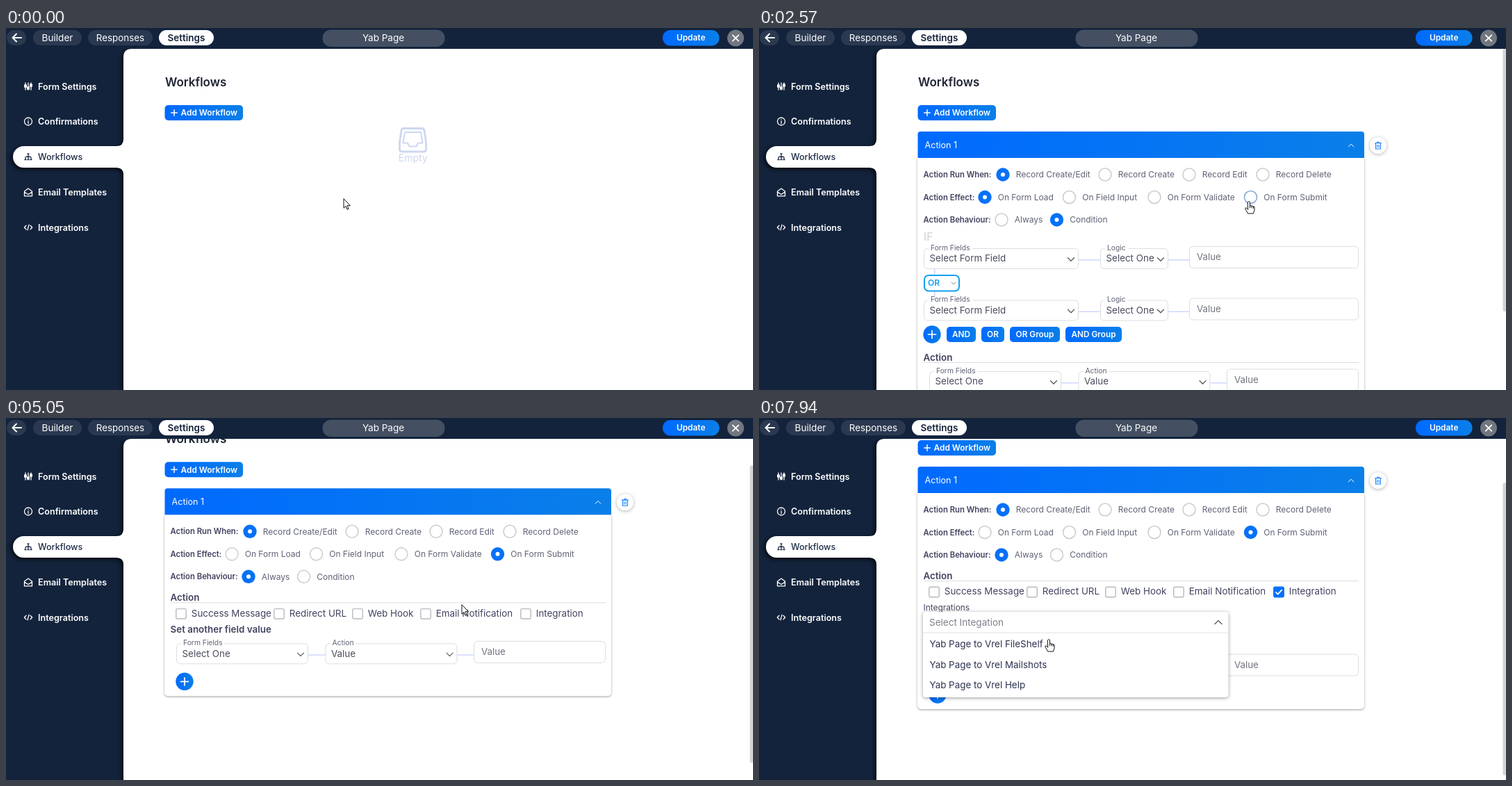
An HTML page with a canvas that plays this animation: 1075 px wide and 521 px high, repeating every 8 s.

```html
<!DOCTYPE html>
<html lang="en">
<head>
<meta charset="utf-8">
<title>Workflow settings</title>
<style>
html, body { margin: 0; width: 100%; height: 100%; overflow: hidden; background: #13233c; }
canvas { display: block; width: 100vw; height: 100vh; }
</style>
</head>
<body>
<canvas id="stage"></canvas>
<script>
const W = 1075, H = 521, LOOP = 8000;
const canvas = document.getElementById('stage');
const ratio = window.devicePixelRatio || 1;
canvas.width = W * ratio;
canvas.height = H * ratio;
const c = canvas.getContext('2d');

const NAVY = '#13233c', BLUE = '#0671f8', INK = '#41435f', GREY = '#5f6275', EDGE = '#dcdde2';
const LINK = '#cfd8fb', PALE = '#cdd7ef';
const APP = 'Yab Page';

// Moments of the user's clicks, in ms
const ADD = 520, OPEN = 1800, SUBMIT = 3130, ALWAYS = 4330, SCROLL = 4920, CHECK = 6070, DROP = 6840;

// Pointer path: time, x, y
const PATH = [
  [30, 486, 246], [380, 300, 122], [930, 300, 122], [1320, 446, 163], [1710, 560, 178],
  [2050, 560, 178], [2560, 705, 249], [2640, 705, 249], [2960, 712, 247], [3200, 712, 247],
  [3650, 397, 243], [3880, 352, 248], [3960, 352, 248], [4180, 349, 275], [4430, 349, 275],
  [4930, 656, 269], [5250, 656, 269], [5950, 748, 251], [6270, 748, 251], [6690, 432, 286],
  [7570, 432, 286], [7630, 427, 285], [7840, 427, 285], [7940, 417, 318]
];
const ARROW_TIMES = [[0, 330], [1000, 1180], [2200, 2420], [4520, 5420], [6360, 6600]];

const clamp = v => Math.max(0, Math.min(1, v));
const ease = v => { v = clamp(v); return v * v * (3 - 2 * v); };
const span = (t, from, to) => ease((t - from) / (to - from));
const mix = (a, b, p) => `rgb(${a.map((v, i) => Math.round(v + (b[i] - v) * p)).join()})`;

function pointer(t) {
  if (t <= PATH[0][0]) return PATH[0].slice(1);
  for (let i = 1; i < PATH.length; i++) {
    const [t0, x0, y0] = PATH[i - 1], [t1, x1, y1] = PATH[i];
    if (t <= t1) {
      const p = span(t, t0, t1);
      return [x0 + (x1 - x0) * p, y0 + (y1 - y0) * p];
    }
  }
  return PATH[PATH.length - 1].slice(1);
}

// Share of the recent past the pointer spent in a box, as a soft hover fade
function hover(t, x, y, w, h) {
  let n = 0;
  for (let k = 0; k < 9; k++) {
    const [px, py] = pointer(t - k * 40);
    if (px >= x && px <= x + w && py >= y && py <= y + h) n++;
  }
  return Math.min(1, n / 4);
}

function text(s, x, cy, size, color, weight = 400, align = 'left') {
  c.font = `${weight} ${size}px Inter, "Open Sans", sans-serif`;
  c.textAlign = align;
  c.fillStyle = color;
  c.fillText(s, x, cy + size * 0.36);
}

function box(x, y, w, h, r, fill, stroke, lw = 1) {
  c.beginPath();
  c.roundRect(x, y, w, h, r);
  if (fill) { c.fillStyle = fill; c.fill(); }
  if (stroke) { c.strokeStyle = stroke; c.lineWidth = lw; c.stroke(); }
}

function disc(x, y, r, fill, stroke, lw = 1) {
  c.beginPath();
  c.arc(x, y, r, 0, 7);
  if (fill) { c.fillStyle = fill; c.fill(); }
  if (stroke) { c.strokeStyle = stroke; c.lineWidth = lw; c.stroke(); }
}

function line(d, x, y, color, lw = 1, fill) {
  const path = new Path2D(d);
  c.save();
  c.translate(x, y);
  c.lineCap = c.lineJoin = 'round';
  if (fill) { c.fillStyle = fill; c.fill(path); }
  c.strokeStyle = color;
  c.lineWidth = lw;
  c.stroke(path);
  c.restore();
}

function shadowed(color, blur, dx, dy, draw) {
  c.save();
  c.shadowColor = color;
  c.shadowBlur = blur * ratio;
  c.shadowOffsetX = dx * ratio;
  c.shadowOffsetY = dy * ratio;
  draw();
  c.restore();
}

function blueFade(x, w) {
  const g = c.createLinearGradient(x, 0, x + w, 0);
  g.addColorStop(0, '#006aff');
  g.addColorStop(1, '#0a7fe8');
  return g;
}

const chevron = (x, y, color, s = 4.5, up) =>
  line(up ? `M${-s} ${s / 2}L0 ${-s / 2}L${s} ${s / 2}` : `M${-s} ${-s / 2}L0 ${s / 2}L${s} ${-s / 2}`, x, y, color, s > 4 ? 1.2 : 1);

const plus = (x, y, s, lw) => line(`M${-s} 0H${s}M0 ${-s}V${s}`, x, y, '#fff', lw);

function button(s, x, y, w) {
  box(x, y, w, 22, 5, blueFade(x, w));
  text(s, x + w / 2, y + 11, 11.8, '#fff', 600, 'center');
}

function roundPlus(x, y) {
  disc(x, y, 12.7, blueFade(x - 13, 26));
  plus(x, y, 5.5, 1.7);
}

function select(label, value, x, y, w) {
  box(x + .5, y + .5, w - 1, 29, 5, '#fff', EDGE);
  c.font = '400 10.3px Inter, "Open Sans", sans-serif';
  c.fillStyle = '#fff';
  c.fillRect(x + 7, y - 2, c.measureText(label).width + 6, 5);
  text(label, x + 10, y - 1, 10.3, GREY);
  text(value, x + 8.5, y + 14.5, 13.4, '#4a4d5e');
  chevron(x + w - 11, y + 16, '#555', 4.5);
}

function valueBox(x, y, w) {
  box(x + .5, y + .5, w - 1, 31, 5, '#fff', EDGE);
  text('Value', x + 11, y + 15.5, 13.3, '#72757f');
}

function link(x0, x1, y) {
  c.fillStyle = LINK;
  c.fillRect(x0, y, x1 - x0, 1.5);
}

function radios(title, cy, items, chosen, t) {
  text(title, 236.5, cy, 11.3, INK, 600);
  items.forEach(([s, x], i) => {
    if (i === chosen) {
      disc(x, cy, 9.7, BLUE);
      disc(x, cy, 3, '#fff');
    } else {
      const live = t > 2150 && t < 4500 && hover(t, x - 12, cy - 12, 100, 24);
      disc(x, cy, 9, '#fff', mix([204, 204, 206], [112, 152, 216], live || 0), 1.5);
    }
    text(s, x + 18.7, cy, 12, GREY);
  });
}

function condition(y) {
  select('Form Fields', 'Select Form Field', 237, y, 223);
  select('Logic', 'Select One', 491, y, 98);
  valueBox(619, y - 3, 244);
  link(460, 491, y + 16);
  link(589, 619, y + 16);
}

function checks(cy, on) {
  const items = [['Success Message', 252], ['Redirect URL', 393], ['Web Hook', 506], ['Email Notification', 604], ['Integration', 748]];
  items.forEach(([s, x], i) => {
    const ticked = on && i === 4;
    box(x - 7.2, cy - 6.2, 14.4, 14.4, 2, ticked ? BLUE : '#fff', ticked ? BLUE : '#b9bac0', 1.4);
    if (ticked) line('M-4 1L-1.3 3.8L4.2 -2.2', x, cy + .3, '#fff', 1.8);
    text(s, x + 14.8, cy, 13.4, INK);
  });
}

function layout(t) {
  const submit = t >= SUBMIT, always = t >= ALWAYS, linked = t >= CHECK;
  const head = always ? 306 : 474;
  const row = head + (linked ? 116 : submit ? 66 : 20);
  return { submit, always, linked, head, row, bottom: row + 76 };
}

function cardBody(t, m) {
  radios('Action Run When:', 211, [['Record Create/Edit', 351], ['Record Create', 498], ['Record Edit', 619], ['Record Delete', 725]], 0, 0);
  radios('Action Effect:', 243.5, [['On Form Load', 325], ['On Field Input', 446.5], ['On Form Validate', 569], ['On Form Submit', 707.5]], m.submit ? 3 : 0, t);
  radios('Action Behaviour:', 276, [['Always', 349], ['Condition', 428.5]], m.always ? 0 : 1, t);
  if (!m.always) {
    text('IF', 237, 300.5, 15.5, '#d9dade', 600);
    c.fillStyle = LINK;
    c.fillRect(252, 347, 1.5, 45);
    condition(317);
    condition(391.5);
    box(238, 356, 50, 22.5, 6, '#fff', '#12a0ee', 2);
    text('OR', 243, 367, 12, '#12a0ee', 600);
    chevron(280, 367.5, '#888', 3);
    roundPlus(249, 441);
    button('AND', 270, 430, 42);
    button('OR', 320, 430, 33);
    button('OR Group', 361, 430, 72);
    button('AND Group', 441, 430, 81);
  }
  text('Action', 236.5, m.head, 13.4, INK, 600);
  c.fillStyle = EDGE;
  c.fillRect(237, m.head + 7, 626, 1);
  if (m.submit) {
    checks(m.head + 22.5, m.linked);
    text('Set another field value', 236.5, m.row - 20, 13.4, INK, 600);
  }
  if (m.linked) {
    text('Integrations', 236.5, m.head + 45.5, 11.9, INK);
    box(236.5, m.head + 52.5, 438, 29, 4, '#fff', EDGE);
    text('Select Integation', 245, m.head + 67, 13.5, '#7d8089');
    chevron(661, m.head + 67.5, '#555', 5, t >= DROP);
  }
  select('Form Fields', 'Select One', 245, m.row, 190);
  select('Action', 'Value', 459.5, m.row, 190);
  valueBox(673, m.row - 3.5, 190);
  link(435, 459.5, m.row + 16);
  link(649.5, 673, m.row + 16);
  roundPlus(257, m.row + 55);
}

function dropdown(t, head) {
  const p = span(t, DROP, DROP + 220);
  if (!p) return;
  const y = head + 52;
  c.save();
  c.globalAlpha = p;
  shadowed('rgba(0,0,0,.4)', 5, 0, 1, () => box(236, y, 439.5, 30 + 93 * p, 4, '#fff'));
  c.fillStyle = '#e4e4e8';
  c.fillRect(236, y + 29.5, 439.5, 1);
  text('Select Integation', 245, y + 15, 13.5, '#7d8089');
  chevron(661, y + 15, '#555', 5, true);
  c.beginPath();
  c.rect(236, y, 440, 30 + 93 * p);
  c.clip();
  ['Vrel FileShelf', 'Vrel Mailshots', 'Vrel Help'].forEach((s, i) =>
    text(`${APP} to ${s}`, 245.5, y + 46.2 + i * 29.5, 13.4, '#2c3250'));
  c.restore();
}

function collapsedRow(t) {
  const tint = t > 900 ? hover(t, 228, 149, 643, 38) : 0;
  shadowed('rgba(0,0,0,.35)', 3, 0, 1, () => box(228, 149, 643, 38, 4, mix([255, 255, 255], [232, 235, 255], tint)));
  text('Action 1', 238.5, 168, 12.6, '#4b4f6a');
  line('M1 -4H-4.5V4.5H4V0M-1.5 2L-1 -.5L3.6 -5L5.2 -3.4L.8 1.3Z', 396, 168, '#6c6f7c', 1);
  [['Record Create/Edit', 546], ['On Load', 666], ['With Condition', 731]].forEach(([s, x]) => {
    disc(x, 165, 4.2, '#12b76a');
    text(s, x + 8.3, 165, 11.3, '#63667a');
  });
  chevron(852, 169, '#333', 3.8);
}

function emptyNote() {
  line('M-13 -17H13Q16 -17 16.6 -14L19 3V13Q19 16.5 15.5 16.5H-15.5Q-19 16.5 -19 13V3L-16.6 -14Q-16 -17 -13 -17Z', 585.5, 161.5, PALE, 2.8);
  line('M-14 4L-11.5 -11.5H11.5L14 4H7.5L5 9H-5L-7.5 4Z', 585.5, 161.5, PALE, 2);
  text('Empty', 585.7, 186.5, 14, PALE, 400, 'center');
}

function page(t) {
  const m = layout(t);
  const scroll = 79 * span(t, SCROLL, SCROLL + 230);
  const grow = span(t, OPEN, OPEN + 330);
  c.save();
  c.beginPath();
  c.rect(169, 30, W - 169, H - 30);
  c.clip();
  c.save();
  c.translate(0, -scroll);
  text('Workflows', 229, 78, 17, '#1f2534', 600);
  box(228.5, 111, 112.5, 22, 5, blueFade(228, 113));
  plus(242, 122, 4.2, 1.5);
  text('Add Workflow', 251.5, 122, 11.9, '#fff', 600);

  const shown = span(t, ADD - 60, ADD + 170);
  if (shown < 1) {
    c.globalAlpha = 1 - shown;
    emptyNote();
  }
  if (shown > 0) {
    c.globalAlpha = shown;
    if (grow < 1) collapsedRow(t);
    shadowed('rgba(0,0,0,.3)', 5, 0, 1, () => disc(891, 169, 12, '#fff'));
    line('M-4.5 -3.2H4.5M-1.5 -3.2V-4.8H1.5V-3.2M-3.5 -3V5H3.5V-3M-1.2 -.8V2.8M1.2 -.8V2.8', 891, 169, '#1680ff', 1.1);
  }
  c.globalAlpha = 1;
  if (grow > 0) {
    const bottom = 187 + (m.bottom - 187) * grow;
    shadowed('rgba(0,0,0,.38)', 3, 0, 1, () => box(228, 187, 643, bottom - 187, [0, 0, 5, 5], '#fff'));
    c.save();
    c.beginPath();
    c.rect(228, 187, 643, bottom - 187);
    c.clip();
    cardBody(t, m);
    c.restore();
    c.globalAlpha = Math.min(1, grow * 2);
    box(228.5, 149, 642.5, 38, [4, 4, 0, 0], blueFade(228, 643));
    text('Action 1', 238.5, 168, 12.6, '#fff');
    chevron(852, 169, '#fff', 3.8, true);
    c.globalAlpha = 1;
    dropdown(t, m.head);
  }
  c.restore();
  if (grow > .8) {
    const size = m.linked ? 421 : m.always ? 428 : m.submit ? 357 : 378;
    box(1070.5, 30 + scroll * .8, 5, size, 2.5, '#d3d4d6');
  }
  c.restore();
}

const NAV = [
  ['Form Settings', 84, 'M-4 -5V5M0 -5V5M4 -5V5M-5.3 -2H-2.7V1H-5.3ZM-1.3 1H1.3V4H-1.3ZM2.7 -3H5.3V0H2.7Z'],
  ['Confirmations', 134.5, 'M5.5 0A5.5 5.5 0 1 1 -5.5 0A5.5 5.5 0 1 1 5.5 0M0 -.5V3M0 -2.8V-2.7'],
  ['Workflows', 185.5, 'M0 -4.5V4M-4 4V1Q-4 -.5 0 -.5Q4 -.5 4 1V4M-5 4H-3M-1 4H1M3 4H5M-1 -4.5H1'],
  ['Email Templates', 236.5, 'M-5.5 -1.5L0 -5.5L5.5 -1.5V5.3H-5.5ZM-5.5 -.5L0 3L5.5 -.5'],
  ['Integrations', 287, 'M-3 -2.8L-5.7 0L-3 2.8M3 -2.8L5.7 0L3 2.8M1 -3.8L-1 3.8']
];

function frameBack() {
  c.fillStyle = NAVY;
  c.fillRect(0, 0, W, H);
  const sheet = new Path2D('M1085 30H181Q169 30 169 42V160Q169 170 159 170H25.5A15.5 15.5 0 0 0 25.5 201H159Q169 201 169 211V531H1085Z');
  shadowed('rgba(0,0,0,.85)', 6, -2, 2, () => { c.fillStyle = '#fff'; c.fill(sheet); });
  NAV.forEach(([s, y, icon], i) => {
    const color = i === 2 ? '#1c2b45' : '#fff';
    line(icon, 32, y, color, 1.3);
    text(s, 46, y, 12.6, color, i === 2 ? 500 : 600);
  });
}

function topBar() {
  c.fillStyle = NAVY;
  c.fillRect(0, 0, W, 30);
  box(1, 3, 28, 22, 11, '#2b3950');
  line('M6.5 0H-6M-.5 -5.5L-6 0L-.5 5.5', 15.5, 14, '#fff', 2);
  box(39, 3, 70, 22, 11, '#2b3950');
  box(118, 3, 93, 22, 11, '#2b3950');
  box(220, 3, 79, 22, 11, '#fff');
  text('Builder', 74, 14, 13.6, '#fff', 400, 'center');
  text('Responses', 164.5, 14, 13.4, '#fff', 400, 'center');
  text('Settings', 259.5, 14, 13.5, '#14213a', 600, 'center');
  box(455.5, 2.5, 176, 24.5, 12, '#444f62');
  text(APP, 543, 14.5, 13.5, '#fff', 400, 'center');
  box(945, 3, 81.5, 22.5, 11, blueFade(945, 82));
  text('Update', 985.7, 14, 11.9, '#fff', 600, 'center');
  disc(1050, 14.5, 12, '#72777f');
  line('M-4.2 -4.2L4.2 4.2M4.2 -4.2L-4.2 4.2', 1050, 14.5, '#fff', 1.8);
}

function cursor(t) {
  const [x, y] = pointer(t);
  if (ARROW_TIMES.some(([a, b]) => t >= a && t < b))
    line('M0 0V13.2L3 10.4L5 15.2L7 14.3L5 9.7H9Z', x, y, '#111', 1, '#fff');
  else
    line('M-1.5 1.5Q0 -.6 1.5 1.5V7Q3 5.8 4 7.4Q5.6 6.4 6.3 8Q8 7.4 8 9.3V13Q7.6 15 6.5 18H-1.5Q-3 15 -5 11.5Q-5.6 9.6 -4 9.8Q-2.6 10.4 -1.5 12ZM1.5 7V9.5M4 7.4V10M6.3 8V10.3', x, y, '#111', 1, '#fff');
}

function render(now) {
  const t = now % LOOP;
  c.setTransform(ratio, 0, 0, ratio, 0, 0);
  frameBack();
  page(t);
  topBar();
  cursor(t);
}

const start = performance.now();
function tick() {
  render(performance.now() - start);
  requestAnimationFrame(tick);
}
tick();
</script>
</body>
</html>
```
